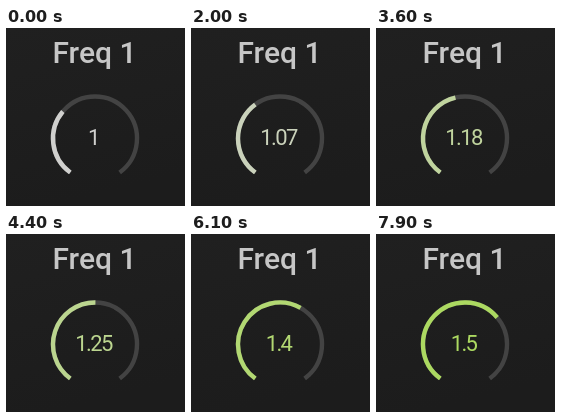
An HTML page for the animation above (8000 ms loop, 179 px wide and 178 px high).

```html
<!DOCTYPE html>
<html lang="en">
<head>
<meta charset="utf-8">
<title>Frequency knob</title>
<style>
  html, body { margin: 0; width: 100%; height: 100%; overflow: hidden; background: #1d1d1d; }
  svg { display: block; width: 100%; height: 100%; }
  text { font-family: Roboto, Inter, sans-serif; }
  #title { font-size: 30px; font-weight: 500; fill: #c6c6c6; }
  #value { font-size: 22px; letter-spacing: -1.6px; text-anchor: middle; }
  path { fill: none; stroke-width: 4.4; }
</style>
</head>
<body>
<svg viewBox="0 0 179 178">
  <defs>
    <linearGradient id="panel" x1="0" y1="0" x2="0.25" y2="1">
      <stop offset="0" stop-color="#202020"/>
      <stop offset="1" stop-color="#1c1c1c"/>
    </linearGradient>
  </defs>
  <rect width="179" height="178" fill="url(#panel)"/>
  <text id="title" x="46.5" y="35">Freq 1</text>
  <path id="track" stroke="#434343"/>
  <path id="level"/>
  <text id="value" x="87.5" y="117"></text>
</svg>
<script>
const LOOP = 8000, STEP = 100;
const GLIDE_START = 2000, GLIDE_END = 7900;
const LOW = 1, GLIDE_FROM = 1.07, HIGH = 1.5;
const GREY = [208, 208, 206], GREEN = [172, 217, 97];
const CENTER = { x: 89, y: 110.5 }, RADIUS = 42, LIMIT = 144;

const track = document.getElementById('track');
const level = document.getElementById('level');
const label = document.getElementById('value');

const mix = (a, b, k) => a + (b - a) * k;

// Cubic ease with a given slope at each end.
function ease(u, startSlope, endSlope) {
  return startSlope * u * (1 - u) ** 2 + u * u * (3 - 2 * u) - endSlope * u * u * (1 - u);
}

// The knob is nudged by hundredths, then glides.
function valueAt(time) {
  if (time < GLIDE_START) return LOW + Math.max(0, Math.floor((time - 755) / 170)) / 100;
  const u = Math.min(1, (time - GLIDE_START) / (GLIDE_END - GLIDE_START));
  return mix(GLIDE_FROM, HIGH, ease(u, 0.76, 0.46));
}

function colorFor(value) {
  const u = (value - LOW) / (HIGH - LOW);
  const k = u * (1.3 - 0.3 * u);
  return `rgb(${GREY.map((c, i) => Math.round(mix(c, GREEN[i], k)))})`;
}

// Angles are in degrees, clockwise from the top.
function point(angle) {
  const a = angle * Math.PI / 180;
  return `${CENTER.x + RADIUS * Math.sin(a)} ${CENTER.y - RADIUS * Math.cos(a)}`;
}

function arc(from, to) {
  return `M${point(from)}A${RADIUS} ${RADIUS} 0 ${+(to - from > 180)} 1 ${point(to)}`;
}

function draw(now) {
  const time = Math.floor((now % LOOP) / STEP) * STEP;
  const value = valueAt(time), color = colorFor(value);
  level.setAttribute('d', arc(-LIMIT, (value - 1.25) * 200));
  level.setAttribute('stroke', color);
  label.setAttribute('fill', color);
  label.textContent = String(+value.toFixed(2));
}

track.setAttribute('d', arc(-LIMIT, LIMIT));
const start = performance.now();
draw(0);
(function tick() {
  draw(performance.now() - start);
  requestAnimationFrame(tick);
})();
</script>
</body>
</html>
```
